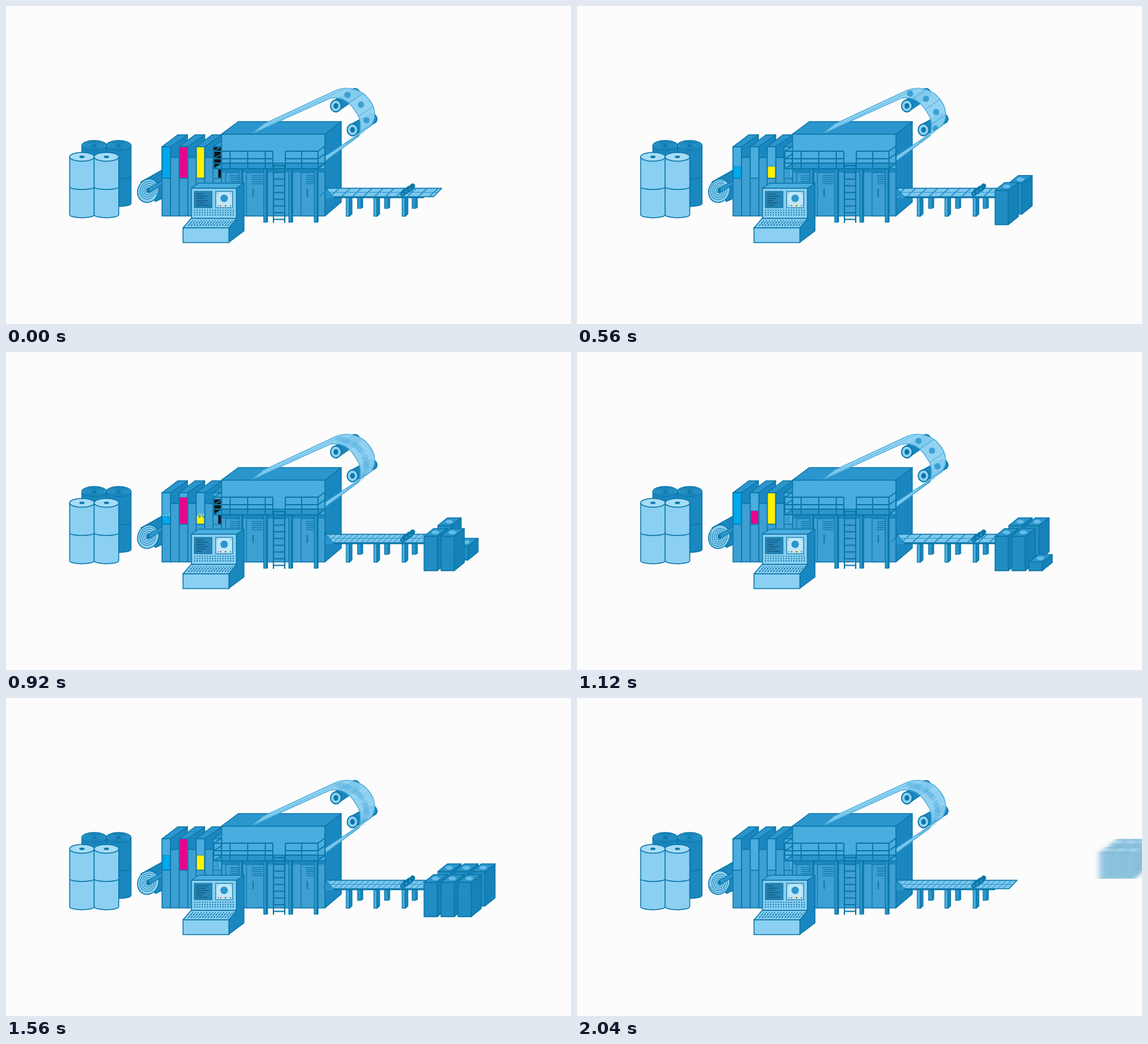
Write an HTML page that moves like this. It is 900 px wide and 506 px high and loops after 2080 ms.

```html
<!DOCTYPE html>
<html lang="en">
<head>
<meta charset="utf-8">
<title>Printing press</title>
<style>
html, body { margin: 0; width: 100%; height: 100%; overflow: hidden; background: #fcfcfc; }
svg { display: block; width: 100vw; height: 100vh; }
</style>
</head>
<body>
<svg id="stage" viewBox="0 0 900 506"></svg>
<script>
const LOOP = 2080, STEP = 40;
const INK = '#0c77a9', LIGHT = '#8bd0f2', PALE = '#a5dcf6', MID = '#4aaddf',
      FACE = '#3e9fd2', TOP = '#2b96cd', DARK = '#1a87c0';

// Drawing helpers returning SVG markup
const poly = (points, fill, extra = '') =>
  `<polygon points="${points}" fill="${fill}" stroke="${INK}" stroke-width="1.5" stroke-linejoin="round" ${extra}/>`;
const path = (d, fill = 'none', stroke = INK, width = 1.5, extra = '') =>
  `<path d="${d}" fill="${fill}" stroke="${stroke}" stroke-width="${width}" stroke-linejoin="round" ${extra}/>`;
const rect = (x, y, w, h, fill, width = 1.5, stroke = INK) =>
  `<rect x="${x}" y="${y}" width="${w}" height="${h}" fill="${fill}" stroke="${stroke}" stroke-width="${width}"/>`;
const oval = (x, y, rx, ry, fill, width = 1.5, stroke = INK) =>
  `<ellipse cx="${x}" cy="${y}" rx="${rx}" ry="${ry}" fill="${fill}" stroke="${stroke}" stroke-width="${width}"/>`;
const repeat = (count, draw) => Array.from({ length: count }, (_, i) => draw(i)).join('');
const clamp = v => Math.max(0, Math.min(1, v));
const smooth = v => (v = clamp(v), v * v * (3 - 2 * v));

function between(keys, t) {
  const i = Math.max(1, keys.findIndex(k => k[0] >= t));
  const [a, b] = [keys[i - 1], keys[i]];
  return a[1] + (b[1] - a[1]) * (t - a[0]) / (b[0] - a[0]);
}

function paperRoll(x, y, bottom, seam, ry, body, cap, rings) {
  const r = 19.6;
  return path(`M${x - r} ${y}V${bottom}a${r} 5 0 0 0 ${2 * r} 0V${y}Z`, body) +
    path(`M${x - r} ${seam}a${r} 4 0 0 0 ${2 * r} 0`) +
    oval(x, y, r, ry, cap) +
    repeat(rings, i => oval(x, y, 15.5 - i * 3.8, ry * (.8 - i * .2), 'none', .9)) +
    oval(x, y, 4, 1.5, INK, .8);
}

function printUnit(x) {
  return poly(`${x + 13.5},224 ${x + 40.5},205 ${x + 40.5},241 ${x + 13.5},241`, DARK) +
    rect(x + 13.5, 241, 14, 93, FACE) +
    poly(`${x},224 ${x + 25},205 ${x + 40.5},205 ${x + 13.5},224`, TOP) +
    rect(x, 224, 13.5, 110, FACE) +
    rect(x, 224, 13.5, 50, MID);
}

function door(x, w) {
  return rect(x, 265, w, 69, FACE, 1.2) +
    repeat(5, i => path(`M${x + w * .3} ${270 + i * 3.2}h${w * .62}`, 'none', INK, 1.2)) +
    path(`M${x + w * .38} 291v13`, 'none', INK, 2);
}

const post = x => rect(x, 260, 4.5, 84, TOP, 1.2) + rect(x + 4.5, 260, 2, 84, INK, .6);

function rails(x1, x2, posts) {
  return path([231, 243].map(y => `M${x1} ${y}H${x2}`).join('') +
    posts.map(x => `M${x} 231V258`).join(''), 'none', INK, 1.8);
}

function machine() {
  return poly('508,204 534,184 534,312 508,334', DARK) +
    poly('343,204 370,184 534,184 508,204', TOP) +
    rect(343.5, 204, 164.5, 55, MID) +
    rect(343.5, 259, 164.5, 75, FACE) +
    `<rect x="344" y="259" width="164" height="6" fill="${DARK}"/>` +
    door(350, 22) + door(383, 28) + door(470, 26);
}

function balcony() {
  return poly('330,259 338,259 338,274 330,274', FACE, 'stroke-opacity=".4"') +
    poly('331,259 344,250 508,250 497,259', TOP) +
    path('M331 259H497L508 250M331 250H425M445 250H497', 'none', INK, 2) +
    path('M331 231L344 223M331 243L344 235M497 231L508 223M497 243L508 235M508 223V250', 'none', INK, 1.6) +
    rails(331, 425, [331, 343, 357, 385, 413, 425]) + rails(445, 497, [445, 471, 497]) +
    [371, 410.5, 450.5, 491].map(post).join('') +
    path('M426 250V345M444 250V345' + repeat(9, i => `M426 ${254 + i * 10.7}H444`), 'none', INK, 2);
}

function roller(x, y, endX, endY, r) {
  const nx = 4.5, ny = r - 1;
  return path(`M${x - nx} ${y - ny}L${endX - nx} ${endY - ny}A${r} ${r} 0 0 1 ${endX + nx} ${endY + ny - 2}L${x + nx} ${y + ny}Z`, DARK) +
    oval(x, y, r, r + 1, LIGHT, 1.8) + oval(x, y, 3.3, 4, INK, 1);
}

const RIBBON = 'M410 188L526 134C546 126 567 134 577 147C590 162 590 180 581 191L509 239V246' +
  'L562 207C567 190 564 178 558 170C548 152 535 143 516 147L392 203Z';

function conveyorLegs() {
  return [560, 603, 647].map(x => rect(x, 303, 6, 19, TOP, 1.2) + rect(x + 6, 303, 2.5, 18, DARK, .8)).join('') +
    [542, 586, 631].map(x => rect(x, 303, 5, 31.5, MID, 1.2) + poly(`${x + 5},303 ${x + 9},303 ${x + 9},331 ${x + 5},334.5`, DARK, 'stroke-width="1"')).join('');
}

function consoleBase() {
  return poly('367,290 379,282 379,358 355,376 355,353 367,338', DARK) +
    poly('295,290 307,282 379,282 367,290', MID) +
    rect(295.5, 290, 71.5, 48, LIGHT) +
    poly('282,353 295,338 367,338 355,353', LIGHT) +
    rect(282, 353, 73, 23.5, LIGHT) +
    rect(300, 295, 28, 26, '#2684b5', 1.2) +
    rect(334, 295, 27, 26, '#bfe7f9', 1.2) +
    `<circle cx="347.5" cy="306" r="6" fill="${TOP}"/>` +
    [337, 358].map(x => oval(x, 298, .7, .7, INK, 0)).join('') +
    ['#00adef', '#ed008c', '#fff000', '#222', '#fff000', INK].map((c, i) => oval(338 + i * 3.9, 317.7, 1, 1, c, 0)).join('') +
    repeat(3, row => repeat(16, i => oval(300.5 + i * 4.1, 325 + row * 3.7, 1.1, 1.1, INK, 0))) +
    repeat(15, i => path(`M${290 + i * 4.5} 350l8 -9`, 'none', INK, 1.3, 'stroke-dasharray="4 1"'));
}

const stage = document.getElementById('stage');
stage.innerHTML = `
  <defs>
    <clipPath id="bandClip"><path d="${RIBBON}"/></clipPath>
    <filter id="smear" x="-30%" width="160%"><feGaussianBlur id="smearSize" stdDeviation="0 0"/></filter>
  </defs>
  <rect width="900" height="506" fill="#fcfcfc"/>
  ${paperRoll(140.5, 222, 314, 271, 8, DARK, TOP, 3)}
  ${paperRoll(179.5, 222, 314, 271, 8, DARK, TOP, 3)}
  ${paperRoll(121, 240, 332, 288, 7, LIGHT, PALE, 0)}
  ${paperRoll(160, 240, 332, 288, 7, LIGHT, PALE, 0)}
  ${path('M215 280L249 261V306L238 311Z', DARK)}
  <g transform="rotate(25 226.5 294)">
    ${oval(226.5, 294, 16.5, 19, LIGHT)}
    <g id="spool"></g>
  </g>
  ${path('M225 291L249 278V284L228 297Z', TOP, INK, 1.2)}
  ${oval(226.5, 294, 2.5, 3.2, INK, 0)}
  ${[248.5, 276, 303, 330].map(printUnit).join('')}
  <g id="inks"></g>
  ${machine()}
  ${roller(525.5, 159, 558, 139, 8.5)}
  ${roller(552, 197, 585, 179, 8.5)}
  ${path(RIBBON, LIGHT, '#3fa5d6', 1.2, 'fill-opacity=".93"')}
  ${path('M399 199L526 138M404 194L540 132M509 243L571 200', 'none', '#6bc0e9', 1)}
  <path id="track" d="M520 141C546 133 571 155 574 176C575 190 572 198 560 207" fill="none"/>
  <g id="prints" clip-path="url(#bandClip)"></g>
  ${balcony()}
  ${conveyorLegs()}
  <g id="belt"></g>
  <g id="pile"></g>
  ${consoleBase()}
  <g id="screen"></g>`;

const el = id => document.getElementById(id);
const track = el('track');

const SLOW_INK = [[0, 1], [120, .94], [360, .68], [720, .14], [820, 0], [880, 0], [1040, 1],
  [1160, 1], [1560, .48], [1880, .05], [1940, 0], [LOOP, 0]];
const inks = [
  { x: 249.3, color: '#00a9ec', keys: SLOW_INK },
  { x: 276.8, color: '#ed008c', keys: [[0, 1], [360, .43], [560, 0], [640, 0], [720, .62], [800, 1],
    [880, .95], [1120, .43], [1320, 0], [1400, 0], [1520, 1], [1560, 1], [1880, .29], [2040, 0], [LOOP, 0]] },
  { x: 303.8, color: '#fff200', keys: SLOW_INK },
  { x: 330.8, color: '#111', keys: [[0, 1], [360, .27], [500, 0], [760, 0], [880, 1], [1080, 0],
    [1600, 0], [1720, 1], [1880, .44], [2020, 0], [LOOP, 0]] }
];

function drawInk({ x, color, keys }, t) {
  const level = between(keys, t);
  if (level < .01) return '';
  const top = 274 - 49.5 * level;
  const filling = level < 1 && between(keys, Math.min(LOOP, t + 1)) > level;
  const surface = filling ? 'q1.5 -4 3 0t3 0t3 0t3 0' : 'h12';
  const drops = filling ? repeat(7, i => oval(x + 1.5 + i * 1.6, top - 1 - (i * 7 % 5), .8, .8, i % 3 ? color : '#fff', 0)) : '';
  return path(`M${x} ${top}${surface}V273.5h-12Z`, color, INK, .6) + drops;
}

function drawSpool(turn) {
  const points = repeat(91, i => {
    const a = i * .28 + turn, r = 2.5 + i * .155;
    return `${i ? 'L' : 'M'}${(226.5 + r * .87 * Math.cos(a)).toFixed(1)} ${(294 + r * Math.sin(a)).toFixed(1)}`;
  });
  return path(points, 'none', INK, .9);
}

function drawPrint(distance, alpha) {
  const p = track.getPointAtLength(distance), q = track.getPointAtLength(distance + 13.5);
  return `<g opacity="${alpha}">${oval(p.x, p.y, 5, 5, '#2d98cf', 0)}` +
    path(`M${q.x - 18} ${q.y + 12}L${q.x + 18} ${q.y - 12}`, 'none', '#3ca0d2', 1) + '</g>';
}

function drawPrints(phase, blurred) {
  const shifts = blurred ? [-.3, -.1, .1, .3] : [0];
  return shifts.map(s => repeat(4, i =>
    drawPrint(((phase + .9 + s) % 1 + i) * 27, blurred ? .2 : .85))).join('');
}

function drawBelt(phase, blurred) {
  const end = blurred ? 701 : 694, pitch = 17.5;
  const shifts = blurred ? [0, .5] : [0];
  const lines = shifts.map(s => repeat(11, i => {
    const x = 513 + ((phase + s) % 1 + i) * pitch;
    return x < end - 3 ? `M${x} 290.5l-13 12` : '';
  })).join('');
  return poly(`509,290 ${end},290 ${end - 13},303.5 521,303.5`, '#7cc8ee') +
    `<path d="M509 291L521 303V306H509Z" fill="${TOP}"/>` +
    path(lines, 'none', '#1683bb', blurred ? 1 : 1.5) +
    path(`M515 296.5H${end - 7}`, 'none', '#2e9ace', 1) +
    path('M521 304.5H666', 'none', INK, 2.6) +
    repeat(3, i => path(`M${632 + i * 5.8} ${299 - i * 3.8}l4 -5`, 'none', INK, 8, 'stroke-linecap="round"') +
      oval(632 + i * 5.8, 299 - i * 3.8, 2, 2.6, TOP, 1));
}

function drawStack(x, base, height) {
  if (height <= 0) return '';
  const y = base - height, sheets = Math.floor(height / 3);
  return poly(`${x},${y} ${x + 21},${y} ${x + 21},${base} ${x},${base}`, TOP) +
    poly(`${x + 21},${y} ${x + 37},${y - 12} ${x + 37},${base - 13} ${x + 21},${base}`, DARK) +
    repeat(sheets, i => path(`M${x} ${base - i * 3 - 2}h21l16 -12.5`, 'none', INK, .9)) +
    poly(`${x},${y} ${x + 15},${y - 12} ${x + 37},${y - 12} ${x + 21},${y}`, TOP) +
    oval(x + 18, y - 6, 6, 3, '#64bde8', 0);
}

function drawPile(t) {
  const filled = (t - 110) * .00421;
  const stack = (order, x, base) => drawStack(x, base, 55 * clamp(filled - order));
  return repeat(3, i => stack(i * 2 + 1, 688 + i * 27, 331)) +
    repeat(3, i => stack(i * 2, 666 + i * 27, 348));
}

function movePile(t) {
  const pile = el('pile');
  const away = smooth((t - 1680) / 180), dash = clamp((t - 1860) / 180);
  const scale = 1 - .26 * away;
  const x = 666 + 91 * away + 76 * dash * dash, y = 348 - 61 * away;
  pile.setAttribute('transform', `translate(${x} ${y}) scale(${scale}) translate(-666 -348)`);
  pile.setAttribute('opacity', 1 - .1 * away - .4 * dash);
  if (away > 0) {
    pile.setAttribute('filter', 'url(#smear)');
    el('smearSize').setAttribute('stdDeviation', `${.4 + 6 * dash} ${.6 * dash}`);
  } else pile.removeAttribute('filter');
}

function drawScreen(step) {
  return repeat(6, i => path(`M303 ${299 + i * 3.6}h${10 + (i * 7 + (step >> 2) * 5) % 12}`, 'none', '#12567d', 1.2));
}

function update(now) {
  const step = Math.floor(now % LOOP / STEP), t = step * STEP;
  const phase = step % 4 / 4, blurred = step % 2 === 1;
  el('spool').innerHTML = drawSpool(step * Math.PI / 4);
  el('inks').innerHTML = inks.map(ink => drawInk(ink, t)).join('');
  el('prints').innerHTML = drawPrints(phase, blurred);
  el('belt').innerHTML = drawBelt(phase, blurred);
  el('pile').innerHTML = drawPile(t);
  movePile(t);
  el('screen').innerHTML = drawScreen(step);
}

const start = performance.now();
function tick() {
  update(performance.now() - start);
  requestAnimationFrame(tick);
}
tick();
</script>
</body>
</html>
```
